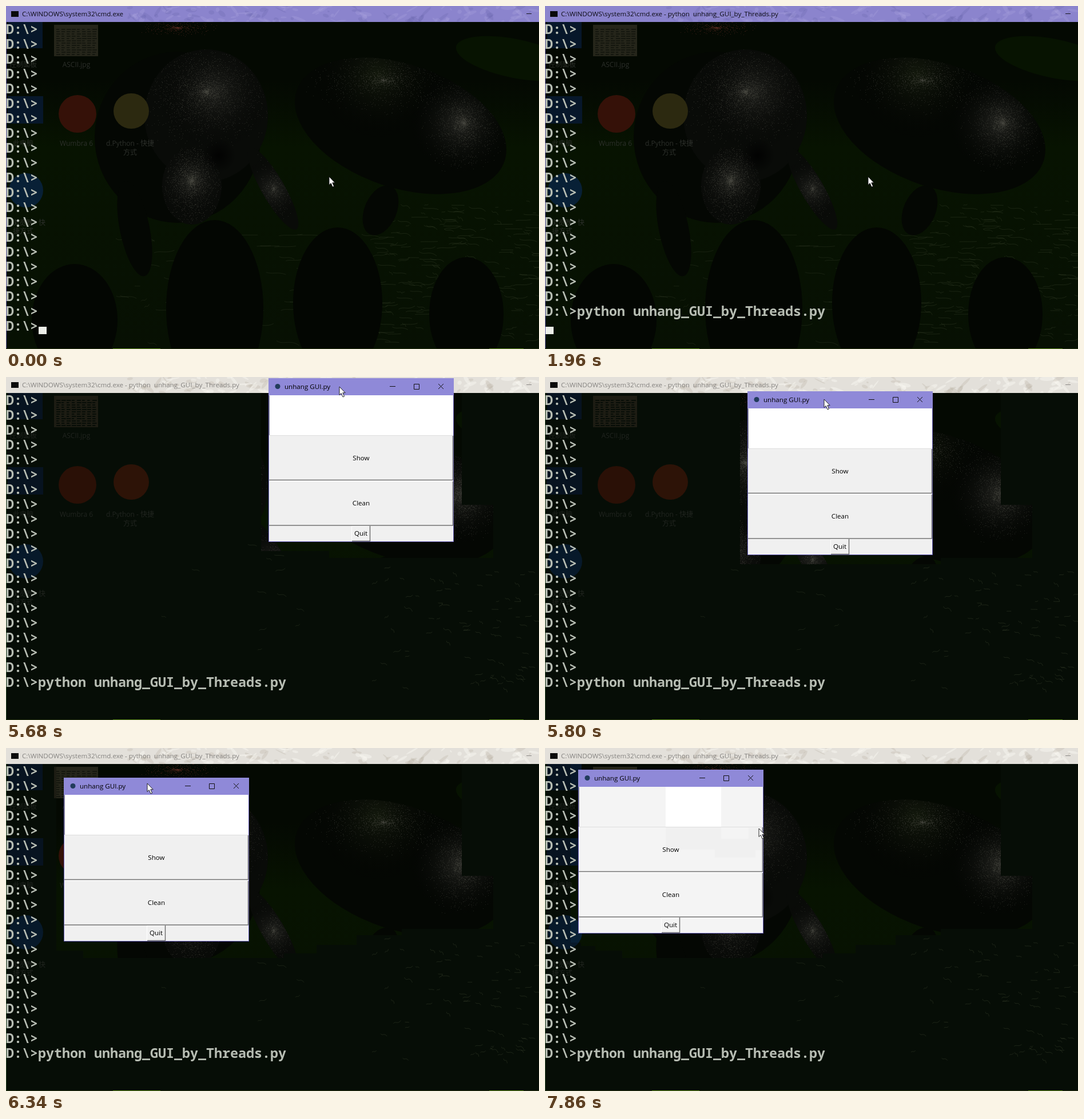
Write an HTML page with a canvas that moves like this. It is 932x601 px and loops after 7.99 s.

```html
<!DOCTYPE html>
<html lang="en">
<head>
<meta charset="utf-8">
<title>Terminal and window</title>
<style>
html, body { margin: 0; width: 100%; height: 100%; overflow: hidden; background: #060d06; }
canvas, svg { position: absolute; left: 0; top: 0; }
text { white-space: pre; }
.ui { font: 11.6px "Open Sans", "Noto Sans", sans-serif; }
.mid { text-anchor: middle; }
#term { font: 600 23.33px "Noto Sans Mono", "DejaVu Sans Mono", monospace; fill: #b7bdb3; }
#desk { font: 12px "Open Sans", "Noto Sans CJK SC", "Noto Sans CJK", sans-serif; text-anchor: middle; }
</style>
</head>
<body>
<canvas id="dim" width="932" height="601"></canvas>
<canvas id="photo" width="932" height="601"></canvas>
<canvas id="barOn" width="932" height="28"></canvas>
<canvas id="barOff" width="932" height="28"></canvas>
<svg width="932" height="601" viewBox="0 0 932 601">
  <clipPath id="holes"><path id="hole"/></clipPath>
  <g id="desk">
    <text x="123" y="107">ASCII.jpg</text>
    <text x="123" y="245">Wumbra 6</text>
    <text x="217" y="245">d.Python - 快捷</text>
    <text x="217" y="261">方式</text>
    <text x="30" y="107">控制面板</text>
    <text x="30" y="245">此电脑</text>
    <text x="40" y="384">浏览器 - 快</text>
    <text x="30" y="399">捷方式</text>
  </g>
  <rect id="edge" y="28" width="1" height="573"/>
  <path d="M0 600.5H932" stroke="#23300f"/>
  <path d="M187 600.5H270M845 600.5H905" stroke="#5b8a18"/>
  <rect x="9" y="9" width="13" height="10" fill="#0a0a0a"/>
  <text id="title" class="ui" x="28" y="18"></text>
  <path id="min" d="M910 13.5H919"/>
  <g id="term"></g>
  <rect id="caret" width="14" height="13" y="562" fill="#eceee8"/>
  <g id="win">
    <rect width="324" height="287" fill="#f4f4f4"/>
    <g id="fresh">
      <rect width="324" height="287" fill="#f0f0f0"/>
      <rect x="2" y="30" width="321" height="70" fill="#fff"/>
    </g>
    <rect x=".5" y=".5" width="323" height="286" fill="none" stroke="#6c64bd"/>
    <rect width="324" height="30" fill="#8f89d8"/>
    <circle cx="16" cy="14.5" r="4.5" fill="#223c5c"/>
    <text class="ui" x="28" y="19">unhang GUI.py</text>
    <path d="M212 14.5H222M254.5 10.5H263.5V19.5H254.5ZM297 10L306 19M306 10L297 19" fill="none" stroke="#111"/>
    <path d="M1.5 100V30.5" stroke="#858585"/>
    <path d="M2 100.5H322" stroke="#dedede"/>
    <path d="M2 180.5H322" stroke="#fff"/>
    <path d="M1 178.5H322.5V101M1 258H322.5V181" fill="none" stroke="#747474" stroke-width="1.6"/>
    <path d="M145.5 286V259.5H177" fill="none" stroke="#fff"/>
    <path d="M146 285.5H177.5V259" fill="none" stroke="#6a6a6a" stroke-width="1.4"/>
    <g class="ui mid">
      <text x="162" y="144">Show</text>
      <text x="162" y="223">Clean</text>
      <text x="161.5" y="276">Quit</text>
    </g>
  </g>
  <path id="mouse" d="M0 0V14.5L3.2 11.5L6 18L8.6 17L5.8 10.7H10.2Z" fill="#fff" stroke="#111" stroke-width=".9"/>
</svg>
<script>
const LOOP = 7990, PASTE = 990, BLINK = 1400, LAUNCH = 1960, BLUR = 2100;
const HOP = 2790, GONE = 2940, DRAG = 5680, GREY = 7170, LEAVE = 7470;
const $ = id => document.getElementById(id);
const ctxOf = id => $(id).getContext("2d");

let seed = 7;
const rnd = () => (seed = (seed * 16807) % 2147483647) / 2147483647;
const span = (a, b) => a + (b - a) * rnd();

function box(c, color, x, y, w, h) { c.fillStyle = color; c.fillRect(x, y, w, h); }

function oval(x, y, rx, ry, turn = 0) {
  const p = new Path2D();
  p.ellipse(x, y, rx, ry, turn, 0, 7);
  return p;
}

function fill(c, color, path) { c.fillStyle = color; c.fill(path); }

function glow(c, x, y, r, color) {
  const g = c.createRadialGradient(x, y, 0, x, y, r);
  g.addColorStop(0, color);
  g.addColorStop(1, "rgba(0,0,0,0)");
  box(c, g, x - r, y - r, 2 * r, 2 * r);
}

function specks(c, n, x, y, rx, ry, color = "rgba(70,70,62,.42)") {
  c.fillStyle = color;
  for (let i = 0; i < n; i++) {
    const a = rnd() * 6.283, r = Math.sqrt(rnd()) * rnd();
    c.fillRect(Math.round(x + Math.cos(a) * r * rx), Math.round(y + Math.sin(a) * r * ry), 1, 1);
  }
}

function ripples(c, n, x0, y0, x1, y1, len, alpha) {
  c.strokeStyle = `rgba(75,83,58,${alpha})`;
  for (let i = 0; i < n; i++) {
    const x = span(x0, x1), y = span(y0, y1), w = span(5, len), d = span(-6, 9);
    c.beginPath();
    c.moveTo(x, y);
    c.bezierCurveTo(x + w * .3, y + d, x + w * .6, y - d * .4, x + w, y + d);
    c.stroke();
  }
}

// Fills a part made of one path, then textures the inside of it.
function part(c, path, color, texture) {
  c.save();
  c.clip(path);
  box(c, color, 0, 0, 932, 601);
  texture();
  c.restore();
}

function icons(c, k) {
  box(c, k.blue, 4, 28, 60, 46);
  box(c, k.blue, 3, 158, 62, 48);
  fill(c, k.sky, oval(35, 323, 30, 30));
  fill(c, k.red, oval(125, 189, 33, 33));
  fill(c, k.amber, oval(219, 184, 31, 31));
  box(c, k.paper, 84, 33, 77, 55);
  for (let y = 40; y < 86; y += 4) {
    for (let x = 88; x < 156; x += 9) box(c, k.ink, x, y, span(4, 8), 2);
  }
}

function paintDim() {
  const c = ctxOf("dim");
  box(c, "#060d06", 0, 0, 932, 601);
  ripples(c, 80, 640, 335, 925, 550, 14, .35);
  ripples(c, 12, 260, 290, 520, 500, 18, .3);
  icons(c, { blue: "#071320", sky: "#07192a", red: "#2a1006", amber: "#2d1307", paper: "#1d1c13", ink: "#070d07" });
}

function paintPhoto() {
  const c = ctxOf("photo"), shade = "#030602", hide = "#040703";
  box(c, "#040902", 0, 0, 932, 601);
  const g = c.createLinearGradient(0, 130, 0, 601);
  g.addColorStop(0, "rgba(7,18,1,0)");
  g.addColorStop(.25, "#071301");
  g.addColorStop(1, "#071003");
  box(c, g, 0, 130, 932, 471);
  fill(c, "#071301", oval(890, 92, 105, 34, .2));
  specks(c, 420, 300, 38, 80, 18, "rgba(110,50,40,.4)");

  ripples(c, 210, 640, 340, 930, 590, 34, .3);
  ripples(c, 75, 180, 400, 660, 590, 42, .26);
  fill(c, shade, oval(365, 530, 85, 155));
  fill(c, shade, oval(580, 520, 78, 132));
  fill(c, shade, oval(805, 540, 65, 100));
  fill(c, shade, oval(120, 550, 75, 98));

  // near animal: trunk, leg, head, muzzle, flipper
  fill(c, hide, oval(300, 230, 145, 150));
  fill(c, hide, oval(225, 390, 26, 85, -.2));
  const skin = "#090b08";
  part(c, oval(350, 192, 108, 116), skin, () => {
    glow(c, 365, 150, 105, "rgba(38,38,34,.75)");
    specks(c, 3200, 350, 150, 145, 110);
  });
  part(c, oval(325, 315, 52, 68), skin, () => {
    glow(c, 325, 305, 75, "rgba(38,38,34,.75)");
    specks(c, 2400, 325, 305, 65, 95);
  });
  part(c, oval(467, 320, 20, 82, -.52), skin, () => {
    glow(c, 468, 320, 60, "rgba(42,42,38,.7)");
    specks(c, 500, 468, 320, 50, 80);
  });
  glow(c, 372, 262, 30, "rgba(0,0,0,.8)");

  // far animal: fluke, body
  fill(c, hide, oval(655, 358, 28, 46, .4));
  part(c, oval(690, 210, 192, 108, .33), hide, () => {
    glow(c, 650, 120, 120, "rgba(23,29,15,.8)");
    glow(c, 795, 205, 95, "rgba(42,42,38,.8)");
    specks(c, 1500, 660, 130, 150, 65);
    specks(c, 2000, 800, 205, 80, 95);
  });
  icons(c, { blue: "#07172a", sky: "#082036", red: "#351108", amber: "#2c2910", paper: "#25251a", ink: "#15170f" });
}

function paintBar(id, base, light, dark) {
  const c = ctxOf(id);
  box(c, base, 0, 0, 932, 28);
  seed = 91;
  for (let i = 0; i < 130; i++) {
    const tone = rnd() < .55 ? light : dark;
    fill(c, tone, oval(span(215, 932), span(0, 28), span(2, 13), span(1, 4), span(-1, 1)));
  }
}

paintDim();
paintPhoto();
paintBar("barOn", "#8b84cd", "rgba(170,163,222,.3)", "rgba(105,98,172,.25)");
paintBar("barOff", "#e3e0da", "rgba(247,245,240,.5)", "rgba(184,176,162,.28)");

const PROMPT = "D:\\>", COMMAND = "python unhang_GUI_by_Threads.py";
const rows = Array.from({ length: 21 }, (_, i) => {
  const t = document.createElementNS("http://www.w3.org/2000/svg", "text");
  t.setAttribute("x", 0);
  t.setAttribute("y", 49 + 26 * i);
  t.textContent = PROMPT;
  return $("term").appendChild(t);
});

// Drag key points: step, x, y
const WIN = [[0, 459, 2], [3, 205, 57], [4, 148, 65], [5, 101, 52], [7, 58, 38]];
const GRIP = [[0, 583, 17], [3, 354, 71], [4, 297, 77], [5, 247, 62], [7, 211, 50]];
// Pointer stops: before the window opens, and after the drag
const REST = [565, 299], ASIDE = [841, 225];
const STOPS = [[211, 50], [297, 160], [357, 174], [356, 161], [374, 141]];

// The drag is sampled in alternating steps of 120 and 150 ms.
const stepOf = t => 2 * Math.floor((t - DRAG) / 270) + ((t - DRAG) % 270 >= 120 ? 1 : 0);

function along(keys, n) {
  const i = keys.findIndex(k => k[0] > n);
  if (i < 0) return keys[keys.length - 1].slice(1);
  const [a, b] = [keys[i - 1], keys[i]], u = ((n - a[0]) / (b[0] - a[0])) ** .8;
  return [1, 2].map(j => Math.round(a[j] + (b[j] - a[j]) * u));
}

const rectPath = (l, u, r, d) => `M${l} ${u}H${r}V${d}H${l}Z`;

// The area repainted when the pointer jumps from a to b.
const swept = (a, b) => rectPath(
  Math.min(a[0], b[0]), Math.min(a[1], b[1]) - 1,
  Math.max(a[0], b[0]) + 11, Math.max(a[1], b[1]) + 18);

function bared(t) {
  let d = t >= HOP ? swept(REST, ASIDE) : "M0 0Z";
  for (let n = 0; t >= DRAG && n <= Math.min(stepOf(t), 8); n++) {
    const [x, y] = along(WIN, n);
    d += rectPath(x - 13, 28, x + 338, y + 303);
  }
  return d;
}

const stopOf = t => t < LEAVE ? 0 : Math.min(4, 1 + Math.floor((t - LEAVE) / 120));

function pointer(t) {
  if (t < HOP) return REST;
  if (t < GONE) return ASIDE;
  if (t < DRAG) return [-50, 0];
  return t < LEAVE ? along(GRIP, stepOf(t)) : STOPS[stopOf(t)];
}

const show = (el, on) => { el.style.display = on ? "" : "none"; };
const move = (el, x, y) => el.setAttribute("transform", `translate(${x} ${y})`);
const paint = (id, color, attr = "fill") => $(id).setAttribute(attr, color);
const write = (el, s) => { if (el.textContent !== s) el.textContent = s; };

function drawTerminal(t) {
  const ran = t >= LAUNCH, off = t >= BLUR, typed = t >= PASTE;
  write(rows[19], PROMPT + (ran ? COMMAND : ""));
  write(rows[20], ran ? "" : PROMPT + (typed ? COMMAND : ""));
  write($("title"), "C:\\WINDOWS\\system32\\cmd.exe" + (ran ? " - " + COMMAND.replace(" ", "  ") : ""));
  $("caret").setAttribute("x", ran ? 1 : typed ? 489 : 57);
  show($("caret"), t < BLINK || (ran && !off));

  show($("barOn"), !off);
  show($("barOff"), off);
  paint("title", off ? "#858380" : "#0c0c14");
  paint("min", off ? "#8a8885" : "#15151c", "stroke");
  paint("desk", off ? "#20241f" : "#2c2f2a");
  paint("edge", off ? "#2c482b" : "#6c67a6");
  $("photo").style.clipPath = off ? `path("${bared(t)}")` : "none";
}

function drawWindow(t) {
  show($("win"), t >= DRAG);
  if (t < DRAG) return;
  const [x, y] = along(WIN, stepOf(t));
  move($("win"), x, y);
  $("fresh").setAttribute("clip-path", t >= GREY ? "url(#holes)" : "none");
  let d = "M0 0Z";
  for (let i = 1; i <= stopOf(t); i++) d += swept(STOPS[i - 1], STOPS[i]);
  $("hole").setAttribute("d", d);
  move($("hole"), -x, -y);
}

function draw(t) {
  drawTerminal(t);
  drawWindow(t);
  move($("mouse"), ...pointer(t));
}

const start = performance.now();
function tick() {
  draw(Math.max(0, performance.now() - start) % LOOP);
  requestAnimationFrame(tick);
}
tick();
</script>
</body>
</html>
```
